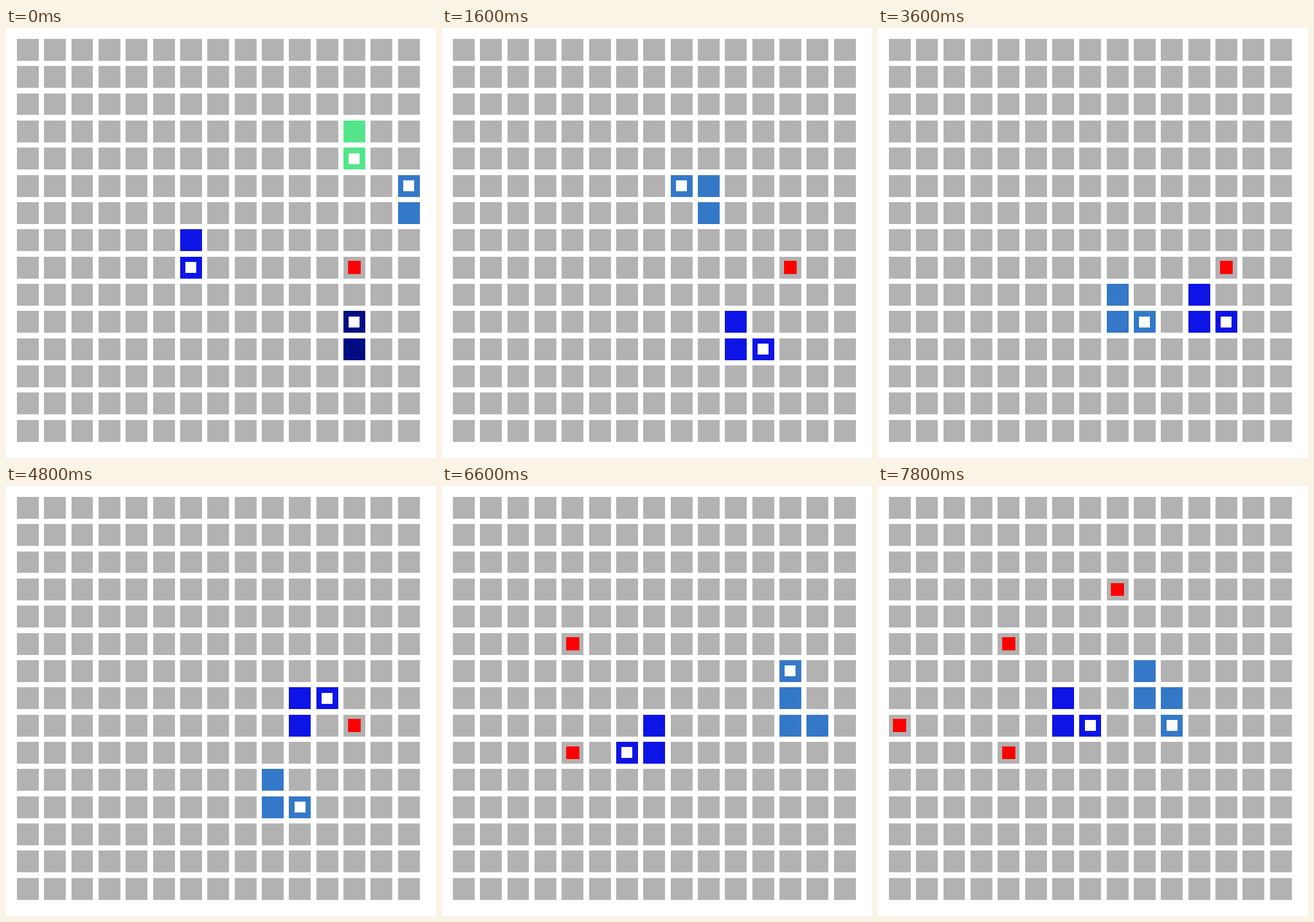
Write an HTML page with a canvas that moves like this. It is 748 px wide and 748 px high and loops after 8000 ms.

```html
<!DOCTYPE html>
<html lang="en">
<head>
<meta charset="utf-8">
<title>Snakes on a grid</title>
<style>
html, body { margin: 0; width: 100%; height: 100%; overflow: hidden; background: #fff; }
canvas { display: block; }
</style>
</head>
<body>
<canvas id="board" width="748" height="748"></canvas>
<script>
const ctx = document.getElementById('board').getContext('2d');
const SIZE = 15, PITCH = 748 / 15.8, CELL = PITCH * 0.8, MARGIN = 18.93;
const STEP = 200, TURNS = 40;
const DIRS = { U: [0, -1], D: [0, 1], L: [-1, 0], R: [1, 0] };

// Each snake leaves its start cell with the first move; it vanishes when its moves run out.
const snakes = [
  { color: '#0d14e6', start: [6, 7], moves: 'DRRDRDRDRURULULDRDRULULURULDLDLLDLURULDR' },
  { color: '#3478c8', start: [14, 6], moves: 'ULLLLDLULDLDLDRDRDRDRULDRURURRULUULLLDRD', grows: 32 },
  { color: '#54e58a', start: [12, 3], moves: 'DR' },
  { color: '#000c82', start: [12, 11], moves: 'UULULD' }
];

const foods = [
  { cell: [12, 8], from: 0, to: 31 },
  { cell: [4, 5], from: 31, to: TURNS },
  { cell: [4, 9], from: 32, to: TURNS },
  { cell: [0, 8], from: 34, to: TURNS },
  { cell: [8, 3], from: 35, to: TURNS }
];

for (const snake of snakes) {
  let [x, y] = snake.start;
  snake.path = [[x, y]];
  for (const move of snake.moves) {
    x += DIRS[move][0];
    y += DIRS[move][1];
    snake.path.push([x, y]);
  }
}

// Edges snap to whole pixels.
function square([col, row], color, inset = 0) {
  const edges = i => {
    const a = MARGIN + i * PITCH;
    return [Math.round(a + inset), Math.round(a + CELL - inset)];
  };
  const [x0, x1] = edges(col), [y0, y1] = edges(row);
  ctx.fillStyle = color;
  ctx.fillRect(x0, y0, x1 - x0, y1 - y0);
}

function drawSnake({ path, color, grows }, turn) {
  const head = turn + 1;
  if (head >= path.length) return;
  const length = turn >= grows ? 4 : 3;
  for (const cell of path.slice(Math.max(0, head - length + 1), head + 1)) square(cell, color);
  square(path[head], '#fff', CELL / 4);
}

function draw(turn) {
  ctx.fillStyle = '#fff';
  ctx.fillRect(0, 0, 748, 748);
  for (let row = 0; row < SIZE; row++) {
    for (let col = 0; col < SIZE; col++) square([col, row], '#b2b2b2');
  }
  for (const food of foods) {
    if (turn >= food.from && turn < food.to) square(food.cell, '#f00', 7.56);
  }
  for (const snake of snakes) drawSnake(snake, turn);
}

const began = performance.now();
function tick() {
  draw(Math.floor((performance.now() - began) / STEP) % TURNS);
  requestAnimationFrame(tick);
}
tick();
</script>
</body>
</html>
```
